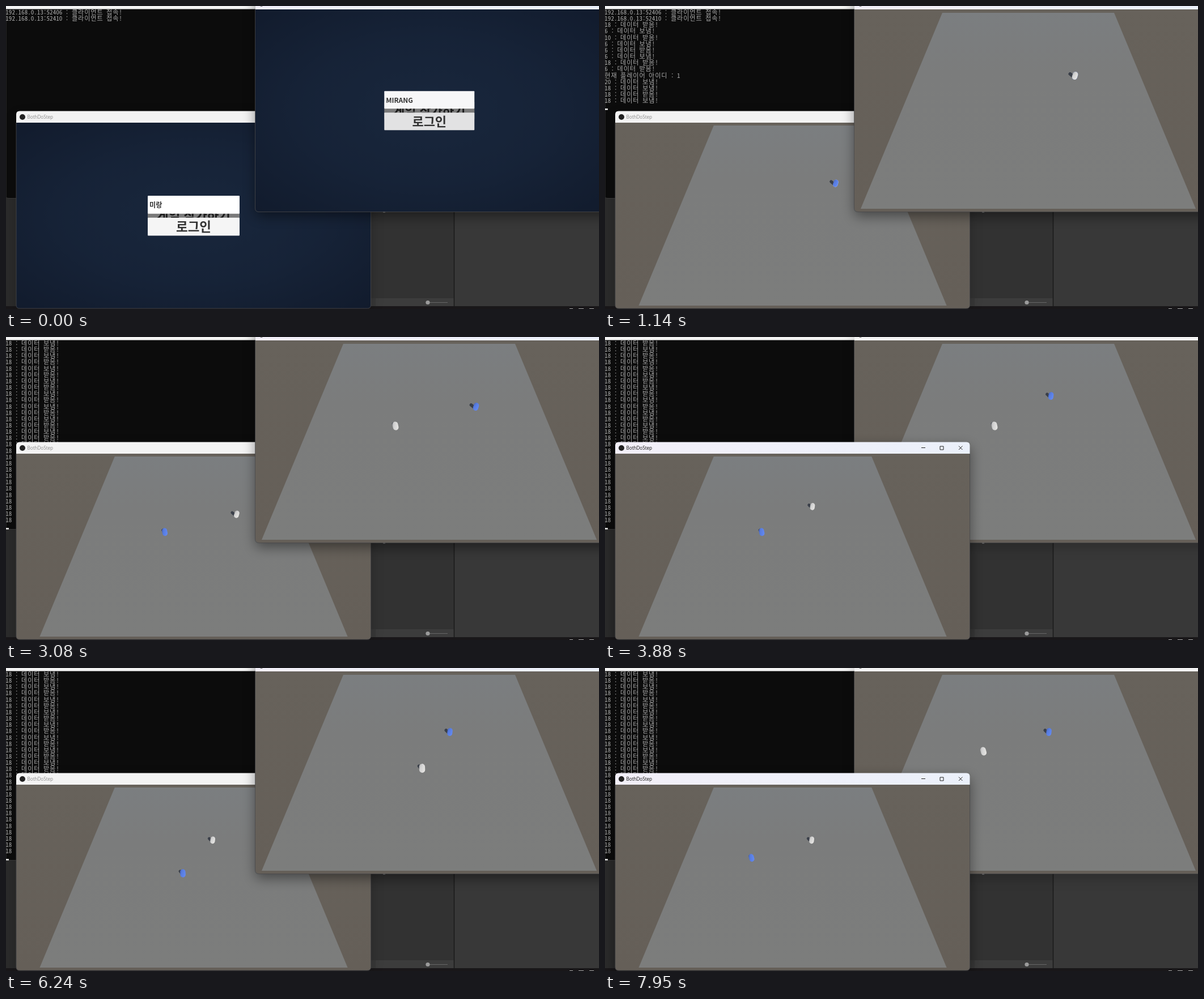
An HTML page for the animation above (8000 ms loop, 1046 by 535 pixels).

```html
<!DOCTYPE html>
<html lang="ko">
<head>
<meta charset="utf-8">
<title>Two clients</title>
<style>
html, body { margin: 0; width: 100%; height: 100%; overflow: hidden; background: #0c0c0c; }
svg { display: block; width: 100%; height: 100%; }
#log text { font: 300 11.15px "Noto Sans Mono CJK KR", "Noto Sans CJK KR", "Noto Sans Mono", monospace; fill: #ababab; }
.ui text { font-family: "Noto Sans CJK KR", "Noto Sans CJK", sans-serif; font-weight: 700; fill: #323232; }
.big { font-size: 22px; text-anchor: middle; }
.name { font-size: 12px; }
.title { font: 8.1px "Open Sans", "Noto Sans", sans-serif; fill: #8b8b8b; }
.bar { fill: #f3f3f3; }
.front .title { fill: #111; }
.front .bar { fill: url(#barFill); }
.shade { opacity: .2; }
.front .shade { opacity: .43; }
.edge { fill: none; stroke: #4a4a4c; stroke-width: .8; }
</style>
</head>
<body>
<svg viewBox="0 0 1046 535" preserveAspectRatio="none">
  <defs>
    <linearGradient id="barFill"><stop stop-color="#f2eff8"/><stop offset="1" stop-color="#ebf0fa"/></linearGradient>
    <linearGradient id="floor" x2="0" y2="1">
      <stop stop-color="#7b7e80"/><stop offset=".3" stop-color="#7b7c7c"/><stop offset="1" stop-color="#7c7d7c"/>
    </linearGradient>
    <linearGradient id="ground" x2="0" y2="1"><stop stop-color="#67625b"/><stop offset="1" stop-color="#655f58"/></linearGradient>
    <radialGradient id="sky" r=".72"><stop stop-color="#324e79"/><stop offset=".5" stop-color="#2d466f"/><stop offset="1" stop-color="#233659"/></radialGradient>
    <linearGradient id="white" y2=".5"><stop stop-color="#a9a9aa"/><stop offset=".4" stop-color="#d2d2d2"/><stop offset="1" stop-color="#e4e3e1"/></linearGradient>
    <linearGradient id="blue" y2=".5"><stop stop-color="#4662b4"/><stop offset=".4" stop-color="#577ce0"/><stop offset="1" stop-color="#6288f0"/></linearGradient>
    <filter id="soft" x="-20%" y="-20%" width="140%" height="140%"><feGaussianBlur stdDeviation="11"/></filter>
    <clipPath id="clipL"><path d="M18 206H643.5V528q0 6-6 6H24q-6 0-6-6z"/></clipPath>
    <clipPath id="clipR"><path d="M440 6H1053V363H446q-6 0-6-6z"/></clipPath>
  </defs>

  <rect width="1046" height="535" fill="#383838"/>
  <rect y="330" width="790" height="200" fill="#323232"/>
  <rect y="330" width="20" height="200" fill="#2b2b2b"/>
  <rect x="640" y="516" width="150" height="14" fill="#3c3c3c"/>
  <rect x="640" y="516" width="12" height="14" fill="#383838"/>
  <path d="M747 523.5H779" stroke="#666"/>
  <circle cx="744" cy="523.5" r="3.6" fill="#9b9b9b"/>
  <path d="M790.5 340V530" stroke="#1a1a1a" stroke-width="1.5"/>
  <rect y="530" width="1046" height="5" fill="#191719"/>
  <path d="M994 534.5h6M1010 534.5h9M1029 534.5h8" stroke="#aaa"/>
  <path d="M665 363.5h4" stroke="#aaa" stroke-width="2"/>

  <path d="M0 0H470V339.500H5q-4 0-5-2z" fill="#0c0c0c" stroke="#3a3a3a"/>
  <rect width="470" height="5.5" fill="#f3f3f3"/>
  <g id="log"></g>
  <rect id="caret" width="5" height="2.5" fill="#f0f0f0"/>
  <g id="wins"></g>
</svg>
<script>
const LOOP = 8000;
const LAG = 60; // delay before the other client sees a move
const ROWS = 29, PITCH = 11.15, CELL = 5.555;
const $ = id => document.getElementById(id);

// Each pair is [time, value], held until the next time.
const front = [[0, 'R'], [330, 'L'], [810, 'R'], [3150, 'L'], [5560, 'R'], [7950, 'L']];
const stageL = [[0, 'login'], [480, 'join'], [870, 'game']];
const stageR = [[0, 'login'], [60, 'join'], [1010, 'game']];
const logSize = [[0, 2], [60, 4], [480, 6], [740, 8], [870, 9], [1010, 12], [1080, 15]];

// Walks in right-window coordinates: [time, x, y].
const walkA = [
  [1690, 829, 123], [2010, 831, 157], [3050, 687, 157],
  [5830, 687, 157], [5990, 699, 176], [6240, 734, 177], [6360, 734, 183],
  [6560, 718, 183], [6700, 718, 174],
  [7150, 718, 174], [7400, 692, 158], [7550, 678, 147], [7630, 667.5, 147]
];
const walkB = [
  [3350, 829, 123], [3560, 823, 104], [3840, 784, 104], [4020, 786, 122],
  [4170, 802, 126], [4500, 803, 121], [4790, 785, 121], [5000, 801, 120],
  [5180, 800, 113], [5340, 783, 113]
];
const busy = [[1690, 3070], [3350, 5340], [5830, 6820], [7150, 7690]];

const GOT = ' : 데이터 받음!', SENT = ' : 데이터 보냄!';
const intro = [
  '192.168.0.13:52406 : 클라이언트 접속!', '192.168.0.13:52410 : 클라이언트 접속!',
  18 + GOT, 6 + SENT, 10 + GOT, 6 + SENT, 6 + GOT, 6 + SENT, 18 + GOT, 6 + GOT,
  '현재 플레이어 아이디 : 1', 20 + SENT, 18 + SENT, 18 + GOT, 18 + SENT
];
const line = n => n < intro.length ? intro[n] : 18 + (n % 2 ? GOT : SENT);

function held(list, t) {
  let value = list[0][1];
  for (const [at, v] of list) if (t >= at) value = v;
  return value;
}

function along(path, t) {
  if (t <= path[0][0]) return path[0].slice(1);
  for (let i = 1; i < path.length; i++) {
    const [t0, x0, y0] = path[i - 1], [t1, x1, y1] = path[i];
    if (t < t1) {
      const k = (t - t0) / (t1 - t0);
      return [x0 + (x1 - x0) * k, y0 + (y1 - y0) * k];
    }
  }
  return path[path.length - 1].slice(1);
}

function lineCount(t) {
  let n = held(logSize, t);
  for (const [from, to] of busy) {
    if (t >= to) n += 2 * Math.floor((to - from) * .03);
    else if (t > from) n += Math.floor((t - from) * .06);
  }
  return n;
}

const joinButton = `<rect x="-79.500" y="-15.500" width="159" height="31" rx="1" fill="#f5f5f5"/>
  <text class="big" y="8">게임 참가하기</text>`;

function scene(id, box, ui, game, name, fields, colors) {
  const [x, y, w, h] = box;
  const area = fill => `<rect x="${x}" y="${y}" width="${w}" height="${h}" fill="${fill}"/>`;
  const pawn = (who, color) => `<path class="cast ${who}" stroke="#3a3f49" stroke-width="5.500" stroke-linecap="round"/>
    <rect class="body ${who}" x="-4.700" y="-7.200" width="9.400" height="14.400" rx="4.700" fill="url(#${color})"/>`;
  return `<g clip-path="url(#clip${id})">
    <g class="menu">${area('url(#sky)')}
      <g class="ui" transform="${ui}">${joinButton}</g>
      <g class="login">${area('rgba(0,0,0,.5)')}
        <g class="ui" transform="${ui}">
          <rect x="-79.500" y="-34.500" width="159" height="31" rx="1" fill="${fields[0]}"/>
          <text class="name" x="-76.500" y="-14">${name}</text>
          <rect x="-79.500" y="3.500" width="159" height="31" rx="1" fill="${fields[1]}"/>
          <text class="big" y="27">로그인</text>
        </g>
      </g>
    </g>
    <g class="game">${area('url(#ground)')}
      <g transform="${game}">
        <path d="M595 12H898L1042 358H451z" fill="url(#floor)"/>
        ${pawn('b', colors[1])}${pawn('a', colors[0])}
      </g>
    </g>
  </g>`;
}

$('wins').innerHTML = `
<g id="L">
  <rect class="shade" x="18" y="194" width="626" height="347" rx="6" filter="url(#soft)"/>
  <path class="bar" d="M18 207V191.500q0-6 6-6H637.500q6 0 6 6V207z"/>
  <circle cx="29" cy="196" r="5" fill="#222"/>
  <text class="title" x="37.500" y="199">BothDoStep</text>
  <path d="M558 195.500h7M591 193h6v6h-6zM624 192.500l6.500 6.500M630.500 192.500l-6.500 6.500" fill="none" stroke="#222"/>
  ${scene('L', [18, 206, 626, 329], 'translate(331 370.250) scale(1.019)', 'translate(-355 200) scale(.919)',
    '미랑', ['#fff', '#f5f5f5'], ['blue', 'white'])}
  <path class="edge" d="M18 206V528q0 6 6 6H637.500q6 0 6-6V206"/>
</g>
<g id="R">
  <rect class="shade" x="440" y="-20" width="640" height="391" rx="6" filter="url(#soft)"/>
  <rect class="bar" x="440" width="606" height="6"/>
  <circle cx="450.500" cy="-4.300" r="5" fill="#222"/>
  ${scene('R', [440, 6, 613, 357], 'translate(746.750 184.750)', '',
    'MIRANG', ['#f7f7f8', '#e2e2e3'], ['white', 'blue'])}
  <path class="edge" d="M439.500 6V357q0 6.500 6.500 6.500H1046"/>
</g>`;

const rows = Array.from({ length: ROWS }, (_, i) => {
  const row = document.createElementNS('http://www.w3.org/2000/svg', 'text');
  row.setAttribute('y', 15 + i * PITCH);
  return $('log').appendChild(row);
});

function setRow(row, str) {
  if (row.textContent === str) return;
  let x = -.7;
  const xs = [...str].map(c => {
    const at = x;
    x += c > '\u1000' ? 2 * CELL : CELL;
    return at.toFixed(2);
  });
  row.setAttribute('x', xs.join(' '));
  row.textContent = str;
}

function showLog(t) {
  const n = lineCount(t), first = Math.max(0, n - ROWS);
  rows.forEach((row, i) => setRow(row, first + i < n ? line(first + i) : ''));
  $('caret').setAttribute('y', 13.8 + Math.min(n, ROWS) * PITCH);
  $('caret').style.display = t < 60 ? 'none' : '';
}

function showStage(win, stage) {
  const show = (part, on) => { win.querySelector(part).style.display = on ? '' : 'none'; };
  show('.menu', stage !== 'game');
  show('.login', stage === 'login');
  show('.game', stage === 'game');
}

// Depth sets the size; distance from the middle sets the lean.
function placePawn(win, who, [x, y]) {
  const size = (303 + 288 * (y - 12) / 346) / 400;
  const off = x - 746.5, lean = off * .2;
  const bx = x - Math.sin(lean * Math.PI / 180) * 4, by = y + 3;
  win.querySelector('.body.' + who)
    .setAttribute('transform', `translate(${x} ${y}) rotate(${lean}) scale(${size})`);
  win.querySelector('.cast.' + who)
    .setAttribute('d', `M${bx} ${by}l${(-5.5 - off * .025) * size} ${-6.2 * size}`);
}

let active = '';
function draw(now) {
  const t = now % LOOP;
  const id = held(front, t);
  if (id !== active) {
    active = id;
    $('wins').appendChild($(id));
    for (const w of ['L', 'R']) $(w).classList.toggle('front', w === id);
  }
  showStage($('L'), held(stageL, t));
  showStage($('R'), held(stageR, t));
  placePawn($('R'), 'a', along(walkA, t));
  placePawn($('R'), 'b', along(walkB, t - LAG));
  placePawn($('L'), 'a', along(walkA, t - LAG));
  placePawn($('L'), 'b', along(walkB, t));
  showLog(t);
}

const start = performance.now();
function tick() {
  draw(performance.now() - start);
  requestAnimationFrame(tick);
}
tick();
</script>
</body>
</html>
```
